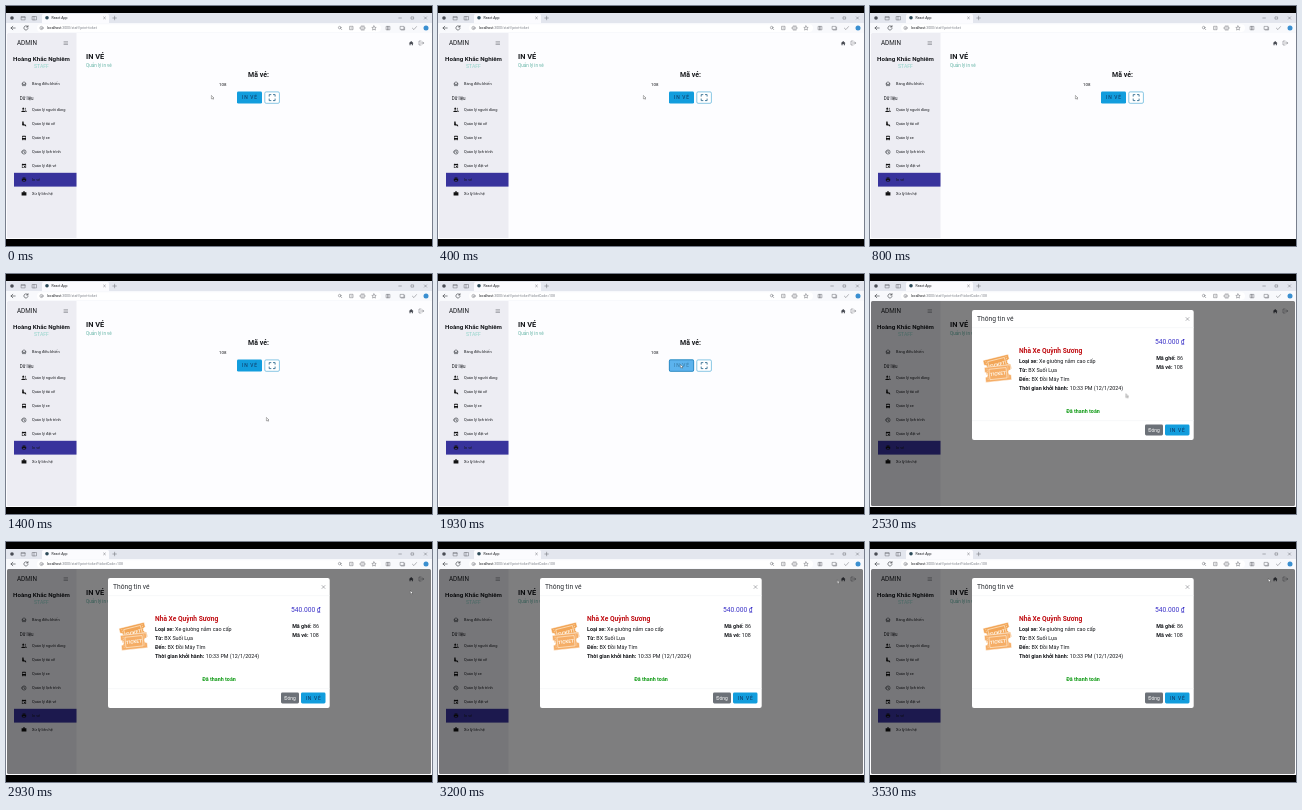
An HTML page that plays this animation: 426x240 px, repeating every 3590 ms.

```html
<!DOCTYPE html>
<html lang="vi">
<head>
<meta charset="utf-8">
<title>In vé</title>
<style>
  html, body { margin: 0; width: 100%; height: 100%; overflow: hidden; background: #000; }
  svg { display: block; width: 100vw; height: 100vh; font-family: Roboto, "Noto Sans", sans-serif; }
  text { fill: #16181c; white-space: pre; }
  .b { font-weight: 700; }
  .mid { text-anchor: middle; }
  .line { fill: none; stroke: #33363c; stroke-width: .6; stroke-linecap: round; stroke-linejoin: round; }
  .thin { stroke: #5a5d64; stroke-width: .45; }
  .url { font-size: 3.5px; }
  .item { font-size: 3.9px; }
  .info { font-size: 5.4px; }
  .btn { font-size: 4.9px; letter-spacing: .75px; fill: #0f315c; }
</style>
</head>
<body>
<svg viewBox="0 0 426 240" preserveAspectRatio="none">
  <rect width="426" height="240"/>

  <!-- browser -->
  <rect y="7" width="426" height="226" fill="#fdfdff"/>
  <rect y="7" width="426" height="10" fill="#e3e6ee"/>
  <rect y="17" width="426" height="10" fill="#f8f9fc"/>
  <path d="M36 17V9.5q0-1.5 1.5-1.5h64q1.5 0 1.5 1.5V17z" fill="#fbfbfe"/>
  <circle cx="6" cy="12" r="1.8" fill="#4a4d55"/>
  <g class="line thin">
    <path d="M15.5 10.5h3.6v3.4h-3.6zM15.5 11.5h3.6M26.5 10.5h4v3.4h-4zM28 10.5v3.4"/>
    <path d="M97.6 11l1.8 1.8m0-1.8l-1.8 1.8M106.8 12h3.6M108.6 10.2v3.6"/>
    <path d="M392.8 12h2.6M405.4 10.9h2.2v2.2h-2.2zM418.4 10.9l2.2 2.2m0-2.2l-2.2 2.2"/>
  </g>
  <path class="line" d="M9.2 22H5m1.8-1.8L5 22l1.8 1.8M21.9 21a2.1 2.1 0 1 0 .1 1.6M22 19.6V21h-1.4"/>
  <circle cx="41" cy="11.8" r="1.8" fill="#2c4a58"/>
  <text x="45.5" y="13" font-size="3.5">React App</text>
  <rect x="31" y="18.2" width="344" height="7.8" rx="3.9" fill="#fff"/>
  <g class="line thin">
    <circle cx="35.5" cy="22" r="1.6"/><path d="M35.5 21.9v.7"/>
    <circle cx="333.7" cy="21.6" r="1.3"/><path d="M334.8 22.7l1 1"/>
    <path d="M344 20.3h3v3.4h-3zM345 22h1M354.5 21h4.4v2h-4.4zM355.3 20h2.8M355.3 24h2.8"/>
    <path d="M368 19.9l.7 1.4 1.5.2-1.1 1 .3 1.6-1.4-.8-1.4.8.3-1.6-1.1-1 1.5-.2z"/>
    <path d="M380.5 20.4h1.6v3.4h-1.6zM382.1 20.4h1.8v3.4h-1.8zM394.5 20.4h3.4v3h-3.4zM395.2 24h3.4v-2.8"/>
    <path d="M406.4 22.2l1.5 1.4 2.6-3"/>
  </g>
  <circle cx="420" cy="22" r="2.5" fill="#3a8fd0"/>
  <text class="url" x="41" y="23.3">localhost<tspan fill="#7d8189">:3000/staff/print-ticket</tspan><tspan id="query" fill="#7d8189">?ticketCode=108</tspan></text>

  <!-- page -->
  <path d="M1 28.5q0-1.5 1.5-1.5h68v205h-68q-1.5 0-1.5-1.5z" fill="#ededf3"/>
  <text x="11" y="39.2" font-size="6.3">ADMIN</text>
  <path class="line thin" d="M58 35.7h3.6M58 37.1h3.6M58 38.5h3.6"/>
  <text class="b mid" x="35.5" y="55.2" font-size="6.2">Hoàng Khắc Nghiêm</text>
  <text class="mid" x="35.5" y="62" font-size="5.1" style="fill:#8fd3c9">STAFF</text>
  <rect x="8" y="166.8" width="62.5" height="13.8" fill="#38339c"/>
  <text x="13.7" y="93.8" font-size="4.5">Dữ liệu</text>
  <g id="menu"></g>

  <text class="b" x="80" y="53" font-size="7.4">IN VÉ</text>
  <text x="80" y="60.6" font-size="4.6" style="fill:#62b3a5">Quản lý in vé</text>
  <path d="M402.8 37.2l2.4-2.2 2.4 2.2h-.7v2h-1.1v-1.3h-1.2v1.3h-1.1v-2z" fill="#4a4d55"/>
  <path class="line thin" d="M415 35h-2v4h2M414.5 37h3.2m-1.2-1.2l1.2 1.2-1.2 1.2"/>
  <text class="b mid" x="252.5" y="70.5" font-size="7">Mã vé:</text>
  <text x="213" y="79.6" font-size="4.4">108</text>
  <rect x="231" y="85.6" width="25" height="12" rx="1.4" fill="#129ddd"/>
  <text class="btn mid" x="243.9" y="93.4">IN VÉ</text>
  <g id="hover">
    <rect x="231.3" y="85.9" width="24.4" height="11.4" rx="1.4" fill="#5cb3ee" stroke="#2d7fb5" stroke-width=".7"/>
    <text class="btn mid" x="243.9" y="93.4" style="fill:#34759f">IN VÉ</text>
  </g>
  <rect x="258.8" y="85.9" width="14.6" height="11.4" rx="1.3" fill="#fff" stroke="#56afd8" stroke-width=".7"/>
  <path class="line" style="stroke:#1d5f86;stroke-width:.8" d="M263.2 90.2v-1.6h1.7M267.4 88.6h1.7v1.6M269.1 93v1.6h-1.7M264.9 94.6h-1.7V93"/>

  <!-- dialog -->
  <rect id="shade" x="1" y="27" width="424" height="205" rx="1.5" fill="#000"/>
  <g id="dialog">
    <rect x="102" y="36" width="221.7" height="130" rx="2" fill="#fff"/>
    <path d="M102 53.6h221.7M102 146.6h221.7" stroke="#f1f2f5" stroke-width=".5"/>
    <text x="107" y="47.1" font-size="6.7" style="fill:#2b2e33">Thông tin vé</text>
    <path class="line thin" d="M316 43.5l3 3m0-3l-3 3"/>
    <g id="tickets"></g>
    <text class="b" x="149" y="78.9" font-size="6.65" style="fill:#c00d12">Nhà Xe Quỳnh Sương</text>
    <text class="info" x="149" y="88.7"><tspan class="b">Loại xe:</tspan> Xe giường nằm cao cấp</text>
    <text class="info" x="149" y="97.7"><tspan class="b">Từ:</tspan> BX Suối Lụa</text>
    <text class="info" x="149" y="106.7"><tspan class="b">Đến:</tspan> BX Đồi Mây Tím</text>
    <text class="info" x="149" y="115.8"><tspan class="b">Thời gian khởi hành:</tspan> 10:33 PM (12/1/2024)</text>
    <text class="info b mid" x="213" y="138.9" style="fill:#0f9a14">Đã thanh toán</text>
    <text class="mid" x="299.8" y="70.3" font-size="6.7" style="fill:#3b32c8">540.000 ₫</text>
    <text class="info mid" x="299.6" y="86.3"><tspan class="b">Mã ghế:</tspan> 86</text>
    <text class="info mid" x="299.6" y="95.2"><tspan class="b">Mã vé:</tspan> 108</text>
    <rect x="275" y="150.5" width="18" height="11" rx="1.4" fill="#6c7178"/>
    <text class="mid" x="284" y="157.8" font-size="4.9" style="fill:#fff">Đóng</text>
    <rect x="295" y="150.5" width="24.5" height="11" rx="1.4" fill="#129ddd"/>
    <text class="btn mid" x="307.6" y="157.8">IN VÉ</text>
  </g>

  <g id="cursor">
    <path d="M-.6-1.6v3.5l.9-.7.6 1.2.6-.3-.5-1.1h1z" fill="#fff" stroke="#333" stroke-width=".35"/>
  </g>
</svg>
<script>
const LOOP = 3590;
const $ = id => document.getElementById(id);

// Icons are drawn around their own centre; s = stroked, f = filled.
const menu = [
  [77.7, 'Bảng điều khiển', 's', 'M-2.2 0L0-2 2.2 0M-1.5-.5V2h1V.5h1V2h1V-.5'],
  [104, 'Quản lý người dùng', 'f', 'M-2.6 2V1.2Q-.8-.4 1 1.2V2zM-.8-.2a1 1 0 1 1 .1 0zM1.4 2V1Q1.2.5.9.2 2.4.3 2.6 1.2V2zM1-.2a1 1 0 0 0 0-2 1.5 1.5 0 0 1 0 2z'],
  [118, 'Quản lý tài xế', 'f', 'M-1-2.5a.8.8 0 1 1-.1 0zM-1.9-.7h1.7l.5 1.1h1.2l.9 1.9h-1.1l-.6-.8h-1.8q-.8 0-.8-.8z'],
  [132, 'Quản lý xe', 'f', 'M-2-1.6q0-.7.7-.7h2.6q.7 0 .7.7v3h-.4v.9h-.9v-.9H-.7v.9h-.9v-.9H-2zM-1.5-1.3V0h3v-1.3z'],
  [146, 'Quản lý lịch trình', 's', 'M-2.1 0a2.1 2.1 0 0 1 4.2 0a2.1 2.1 0 0 1-4.2 0zM0-1.2V.1l.9.6'],
  [159.8, 'Quản lý đặt vé', 'f', 'M-2.1-1.9h.7v-.5h.6v.5H.8v-.5h.6v.5h.7v4.1h-4.2zM-1.6-.6v2.3h3.2V-.6zM.1.2h1.1v1.1H.1z'],
  [173.6, 'In vé', 'f', 'M-1.4-2.1h2.8v1h-2.8zM-2.2-.8h4.4v2h-.8v1h-2.8v-1h-.8zM-.8.4v1.2H.8V.4z'],
  [187.4, 'Xử lý liên hệ', 'f', 'M-2.4-1.2h1.5v-.9H.9v.9h1.5v3.3h-4.8zM-.4-1.2h.8v-.4h-.8z']
];
$('menu').innerHTML = menu.map(([y, label, kind, d]) => `
  <path transform="translate(18 ${y})" d="${d}" ${kind === 's' ? 'class="line"' : 'fill="#111" fill-rule="evenodd"'}/>
  <text class="item" x="26" y="${y + 1.4}">${label}</text>`).join('');

const ticket = (x, y, turn, fill) => `
  <g transform="translate(${x} ${y}) rotate(${turn})">
    <path d="M-13-7.5H13v5a2.5 2.5 0 0 0 0 5v5H-13v-5a2.5 2.5 0 0 0 0-5z" fill="${fill}" stroke="#fff" stroke-width=".5"/>
    <path d="M-8.6-5.2H8.6v10.4H-8.6z" fill="none" stroke="#fff3df" stroke-width=".6"/>
    <path d="M-10.4-6v12M10.4-6v12" stroke="#fff3df" stroke-width=".6" stroke-dasharray="1 1"/>
    <text class="b mid" y="1.7" font-size="4.7" style="fill:#fff8ec">TICKET</text>
  </g>`;
$('tickets').innerHTML = ticket(127.3, 90.6, -14, '#f2a556') + ticket(128, 99.6, -6, '#f5ad66');

// steps: [time, value, easing to the next step]
function play(id, prop, steps) {
  const last = steps[steps.length - 1];
  const frames = [...steps, [LOOP, last[1]]].map(([at, value, easing = 'linear']) =>
    ({ offset: at / LOOP, [prop]: value, easing }));
  $(id).animate(frames, { duration: LOOP, iterations: Infinity });
}
const at = (x, y) => `translate(${x}px, ${y}px)`;
const cut = 'step-end', glide = 'ease-in-out';

play('cursor', 'transform', [
  [0, at(206, 91)], [870, at(206, 91), glide],
  [1340, at(261, 145)], [1470, at(261, 145), glide],
  [1800, at(243, 92)], [2130, at(243, 92), glide],
  [2470, at(256.5, 121.5)], [2600, at(256.5, 121.5), glide],
  [2900, at(405, 50)], [3000, at(405, 50), glide],
  [3270, at(399, 38)]
]);
play('query', 'fillOpacity', [[0, 0, cut], [1870, 1, cut]]);
play('hover', 'opacity', [[0, 0], [1730, 0], [1870, 1]]);
play('shade', 'opacity', [[0, 0], [2070, 0], [2220, .5]]);
play('dialog', 'opacity', [[0, 0], [2130, 0], [2280, 1]]);
play('dialog', 'transform', [[0, at(0, -12)], [2130, at(0, -12), 'ease-out'], [2430, at(0, 0)]]);
</script>
</body>
</html>
```
